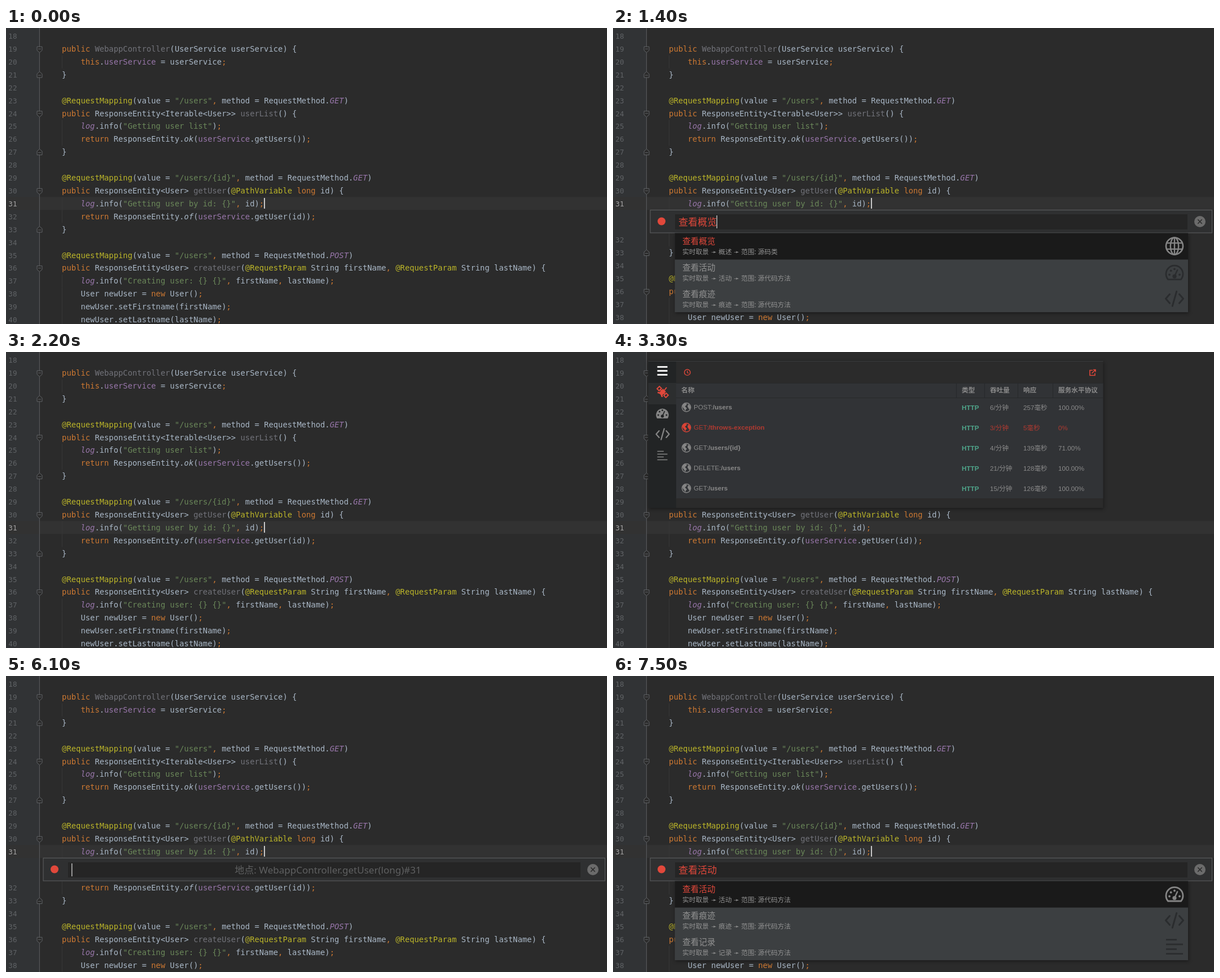
An HTML page that plays this animation: 1065x526 px, repeating every 8000 ms.

```html
<!DOCTYPE html>
<html lang="zh-CN">
<head>
<meta charset="utf-8">
<title>Editor command popup</title>
<style>
html, body { margin: 0; width: 100%; height: 100%; overflow: hidden; background: #2b2b2b; }
svg { display: block; width: 100%; height: 100%; }
text { white-space: pre; }
.code { font: 13.83px "DejaVu Sans Mono", monospace; fill: #a9b7c6; }
.num { font: 12.6px "DejaVu Sans Mono", monospace; fill: #606366; }
.num.on { fill: #a4a3a3; }
.kw { fill: #cc7832; } .str { fill: #6a8759; } .ann { fill: #bbb529; }
.dim { fill: #72737a; } .field { fill: #9876aa; }
.it { font-style: italic; }
.fold { fill: #2b2b2b; stroke: #606366; stroke-width: 1; }
.ui { font-family: "Noto Sans", "Noto Sans CJK SC", "Noto Sans CJK", sans-serif; }
.input { font-size: 17px; }
.title { font-size: 14.6px; fill: #929292; }
.sub { font-size: 11.7px; fill: #929292; }
.table { font: 11.67px "Liberation Sans", "Noto Sans CJK SC", "Noto Sans CJK", sans-serif; fill: #8a8a8a; }
.b { font-weight: bold; }
.red { fill: #e1483b; }
.shadow { filter: drop-shadow(1px 2px 3px rgba(0, 0, 0, .4)); }
.line { fill: none; stroke: currentColor; }
.part { display: none; }
</style>
</head>
<body>
<svg id="stage" viewBox="0 0 1065 526" preserveAspectRatio="none"></svg>
<script>
const RED = '#e1483b', GREY = '#858585', DARK = '#2a2c2e';
const PITCH = 22.91, FIRST = 18, SHIFT = 41.6;

// Prefixes: ~ unused, ^ field, * static field, ! static call
const CODE = `
    public ~WebappController(UserService userService) {
        this.^userService = userService;
    }

    @RequestMapping(value = "/users", method = RequestMethod.*GET)
    public ResponseEntity<Iterable<User>> ~userList() {
        *log.info("Getting user list");
        return ResponseEntity.!ok(^userService.getUsers());
    }

    @RequestMapping(value = "/users/{id}", method = RequestMethod.*GET)
    public ResponseEntity<User> ~getUser(@PathVariable long id) {
        *log.info("Getting user by id: {}", id);
        return ResponseEntity.!of(^userService.getUser(id));
    }

    @RequestMapping(value = "/users", method = RequestMethod.*POST)
    public ResponseEntity<User> ~createUser(@RequestParam String firstName, @RequestParam String lastName) {
        *log.info("Creating user: {} {}", firstName, lastName);
        User newUser = new User();
        newUser.setFirstname(firstName);
        newUser.setLastname(lastName);`.split('\n');

const MARKS = { '~': 'dim', '^': 'field', '*': 'field it', '!': 'it' };
const TOKEN = /"[^"]*"|@\w+|\b(?:public|return|this|long|new)\b|[;,]|[~^*!]\w+|[<>]/g;

const esc = s => s.replace(/</g, '&lt;').replace(/>/g, '&gt;');
const span = (cls, s) => `<tspan class="${cls}">${esc(s)}</tspan>`;
const text = (x, y, s, cls = '', extra = '') => `<text x="${x}" y="${y}" class="${cls}" ${extra}>${s}</text>`;
const rect = (x, y, w, h, fill, extra = '') => `<rect x="${x}" y="${y}" width="${w}" height="${h}" fill="${fill}" ${extra}/>`;
const path = (d, width, extra = '') => `<path class="line" d="${d}" stroke-width="${width}" ${extra}/>`;
const dot = (x, y, r, extra = '') => `<circle cx="${x}" cy="${y}" r="${r}" ${extra}/>`;
const at = (x, y, color, body, scale = 1) =>
  `<g transform="translate(${x} ${y}) scale(${scale})" color="${color}" fill="currentColor">${body}</g>`;
const part = (id, body, cls = '') => `<g id="${id}" class="part ${cls}">${body}</g>`;

const highlight = src => src.replace(TOKEN, t => {
  if (t === '<' || t === '>') return esc(t);
  if (MARKS[t[0]]) return span(MARKS[t[0]], t.slice(1));
  return span(t[0] === '"' ? 'str' : t[0] === '@' ? 'ann' : 'kw', t);
});

const rowY = n => 14.3 + PITCH * (n - FIRST);

function fold(y, up) {
  return `<g class="fold" transform="translate(59.5 ${y}) scale(1 ${up ? -1 : 1})">
    <path d="M-4.5-5h9v6.5l-4.5 4-4.5-4z"/><path d="M-2.5-1h5"/></g>`;
}

function editorRow(src, i) {
  const n = FIRST + i, y = rowY(n);
  let out = '';
  if (src.startsWith('        ')) out += rect(99, y - PITCH / 2, 1, PITCH, '#373737');
  if (/^    public/.test(src)) out += fold(y + 1, false);
  if (src === '    }') out += fold(y, true);
  return out + text(4.3, y + 4.8, n, n === 31 ? 'num on' : 'num')
             + text(65.8, y + 4.8, highlight(src), 'code');
}

const icons = {
  globe: dot(0, 0, 15, 'class="line" stroke-width="2.6"')
    + path('M0-15V15M-14-5.3H14M-14 5.3H14', 2.3)
    + '<ellipse rx="7.2" ry="15" class="line" stroke-width="2.4"/>',
  gauge: path('M-11.5 12.5A15 15 0 1 1 11.5 12.5Z', 2.8, 'stroke-linejoin="round"')
    + dot(-9, 4, 1.9) + dot(-6.3, -3, 1.9) + dot(0, -6, 1.9) + dot(9, 4, 1.9)
    + dot(0, 7, 3.6) + path('M0 7L5.5-5', 2.4),
  gaugeSolid: '<path d="M-9.5 9A11.3 11.3 0 1 1 9.5 9Z"/>'
    + '<g fill="#222425">' + dot(-7.3, 3, 1.5) + dot(-5, -3, 1.5) + dot(0, -5.6, 1.5) + dot(7.3, 3, 1.5)
    + dot(0, 5, 2.7) + '</g>' + path('M0 5L4-4', 1.8, 'style="stroke:#222425"'),
  code: path('M-8.5-8L-15.5 0L-8.5 8M8.5-8L15.5 0L8.5 8M3.7-13L-3.7 13', 3, 'stroke-linecap="round" stroke-linejoin="round"'),
  align: path('M-15-12.5H4M-15-4.2H15M-15 4.2H4M-15 12.5H15', 2.8),
  satellite: '<g transform="rotate(45)">' + path('M-11-3h5v6h-5zM6-3h5v6h-5zM-6 0H6', 2)
    + '<rect x="-3.8" y="-4.5" width="7.6" height="9"/></g>'
    + path('M-9 1A8 8 0 0 1-1 9', 2.6) + path('M3-3L7-8', 2),
  earth: dot(0, 0, 7.7, 'class="line" stroke-width="1.5"')
    + '<path d="M-7-3.5L-3-7 1-6.5 0-3.5-2.5-2-1 0 1 2-1 4-2 7-4 3-6.5 0ZM3-5.5L6.5-3 7.5 1 5 4 3.5 1 2-1Z"/>',
  clock: dot(0, 0, 5.2, 'class="line" stroke-width="1.4"') + path('M0-3V.3L2 1.7', 1.3),
  link: path('M0-4H-5V5H4V1M-1.5 1.5L5-5M1-5H5V-1', 1.6),
  close: dot(0, 0, 10) + path('M-3.7-3.7L3.7 3.7M3.7-3.7L-3.7 3.7', 1.6, 'style="stroke:#2b2b2b"')
};

function menu(id, items) {
  let out = '<g class="shadow">' + rect(109.5, 364.5, 909.5, 140.5, '#3c3f41') + '</g>'
          + rect(109.5, 364.5, 909.5, 47, '#1a1a1a');
  items.forEach(([name, icon, scope], i) => {
    const y = 46.8 * i;
    const bits = [[123, '实时取景'], [174, '➛'], [187, name], [214, '➛'], [227, '范围: ' + scope]];
    out += text(123, 384.3 + y, '查看' + (name === '概述' ? '概览' : name), i ? 'title' : 'title red')
         + text(0, 402.3 + y, bits.map(([x, s]) => `<tspan x="${x}">${s}</tspan>`).join(''), 'sub')
         + at(995, 387.5 + y, i ? DARK : GREY, icons[icon]);
  });
  return part(id, out, 'ui');
}

function popup() {
  return rect(66, 323.5, 995.5, 40.5, '#2f3031', 'stroke="#58595a" stroke-width="1.2"')
    + rect(110, 331, 908, 27, '#252525')
    + dot(86, 343.5, 7, `fill="${RED}"`)
    + at(1040, 344, '#6b6b6b', icons.close);
}

function portal() {
  const cols = [618, 668, 727, 789];
  const heads = ['类型', '吞吐量', '响应', '服务水平协议'];
  const rows = [
    ['POST', '/users', 6, 257, '100.00%'],
    ['GET', '/throws-exception', 3, 5, '0%'],
    ['GET', '/users/{id}', 4, 139, '71.00%'],
    ['DELETE', '/users', 21, 128, '100.00%'],
    ['GET', '/users', 15, 126, '100.00%']
  ];
  let out = '<g class="shadow">' + rect(62.5, 16, 806, 261, '#2b2b2b') + '</g>'
    + rect(62.5, 16, 806, 1, '#393b3d')
    + rect(62.5, 17, 49.5, 260, '#222425') + rect(62.5, 55, 49.5, 38, '#2c2e2f')
    + rect(112, 55, 756.5, 205, '#313336')
    + rect(112, 55, 756.5, 1, '#27292b') + rect(112, 81, 756.5, 1, '#27292b')
    + at(87.5, 33.5, '#f0f0f0', path('M-9-7H9M-9 0H9M-9 7H9', 2.8))
    + at(88, 71, RED, icons.satellite)
    + at(87.5, 109, GREY, icons.gaugeSolid)
    + at(88, 146, GREY, icons.code, .74)
    + at(87.5, 184, GREY, icons.align, .6)
    + at(131.7, 36.2, RED, icons.clock) + at(850, 36.5, RED, icons.link)
    + text(121, 72.3, '名称', 'b');
  cols.forEach((x, i) => {
    out += rect(x - 10, 56, 1, 25, '#27292b') + text(x, 72.3, heads[i], 'b');
  });
  rows.forEach(([verb, url, rate, ms, sla], i) => {
    const y = 98 + 36 * i, bad = sla === '0%';
    const ink = bad ? 'style="fill:#b03a31"' : '';
    out += at(130, y + .3, bad ? '#d94336' : GREY, icons.earth)
      + text(143, y + 3.8, verb + ':' + span('b', url), '', ink)
      + text(cols[0], y + 5, 'HTTP', 'b', 'style="fill:#4fa58a"');
    [rate + '/分钟', ms + '毫秒', sla].forEach((s, k) => out += text(cols[k + 1], y + 5, s, '', ink));
  });
  return part('portal', out, 'table');
}

const SPLIT = 32 - FIRST;
const rows = CODE.map(editorRow);
document.getElementById('stage').innerHTML =
  rect(0, 0, 1065, 526, '#2b2b2b') + rect(0, 0, 59, 526, '#313335')
  + rect(0, 300.3, 1065, 23, '#323232') + rect(58.8, 0, 1.2, 526, '#555759')
  + rows.slice(0, SPLIT).join('')
  + `<g id="below">${rows.slice(SPLIT).join('')}</g>`
  + part('caret', rect(457, 302, 2, 19, '#c8c8c8'))
  + part('popup', popup())
  + part('hint', text(570.5, 350.7, '地点: WebappController.getUser(long)#31', 'input', 'text-anchor="middle" fill="#5f6061"'), 'ui')
  + part('textA', text(116, 351.3, '查看概览', 'input red'), 'ui')
  + part('textB', text(116, 351.3, '查看活动', 'input red'), 'ui')
  + part('start', rect(116, 333, 1.5, 23, '#bbbbbb'))
  + part('end', rect(183.3, 333, 1.5, 23, '#bbbbbb'))
  + menu('menuA', [['概述', 'globe', '源码类'], ['活动', 'gauge', '源代码方法'], ['痕迹', 'code', '源代码方法']])
  + menu('menuB', [['活动', 'gauge', '源代码方法'], ['痕迹', 'code', '源代码方法'], ['记录', 'align', '源代码方法']])
  + portal();

// Visible parts from each moment on
const LOOP = 8000;
const STEPS = [
  [0, 'caret'], [400, ''], [700, 'caret'],
  [800, 'caret popup hint start'], [1300, 'caret popup hint'],
  [1400, 'caret popup textA menuA end'], [2000, 'caret popup textA menuA'],
  [2200, 'caret'], [2300, 'caret portal'], [3300, 'portal'],
  [5600, ''], [5700, 'caret'],
  [6100, 'caret popup hint start'], [6600, 'caret popup hint'],
  [6900, 'caret popup textB end'],
  [7000, 'caret popup textB menuB end'], [7500, 'caret popup textB menuB']
].map(([t, names]) => [t, names.split(' ')]);

const parts = [...document.querySelectorAll('.part')];
const below = document.getElementById('below');
const begin = performance.now();
let shown = null;

function draw() {
  const t = Math.max(0, performance.now() - begin) % LOOP;
  const names = STEPS.filter(s => s[0] <= t).pop()[1];
  if (names !== shown) {
    shown = names;
    for (const p of parts) p.style.display = names.includes(p.id) ? 'inline' : 'none';
    below.setAttribute('transform', `translate(0 ${names.includes('popup') ? SHIFT : 0})`);
  }
  requestAnimationFrame(draw);
}
draw();
</script>
</body>
</html>
```
